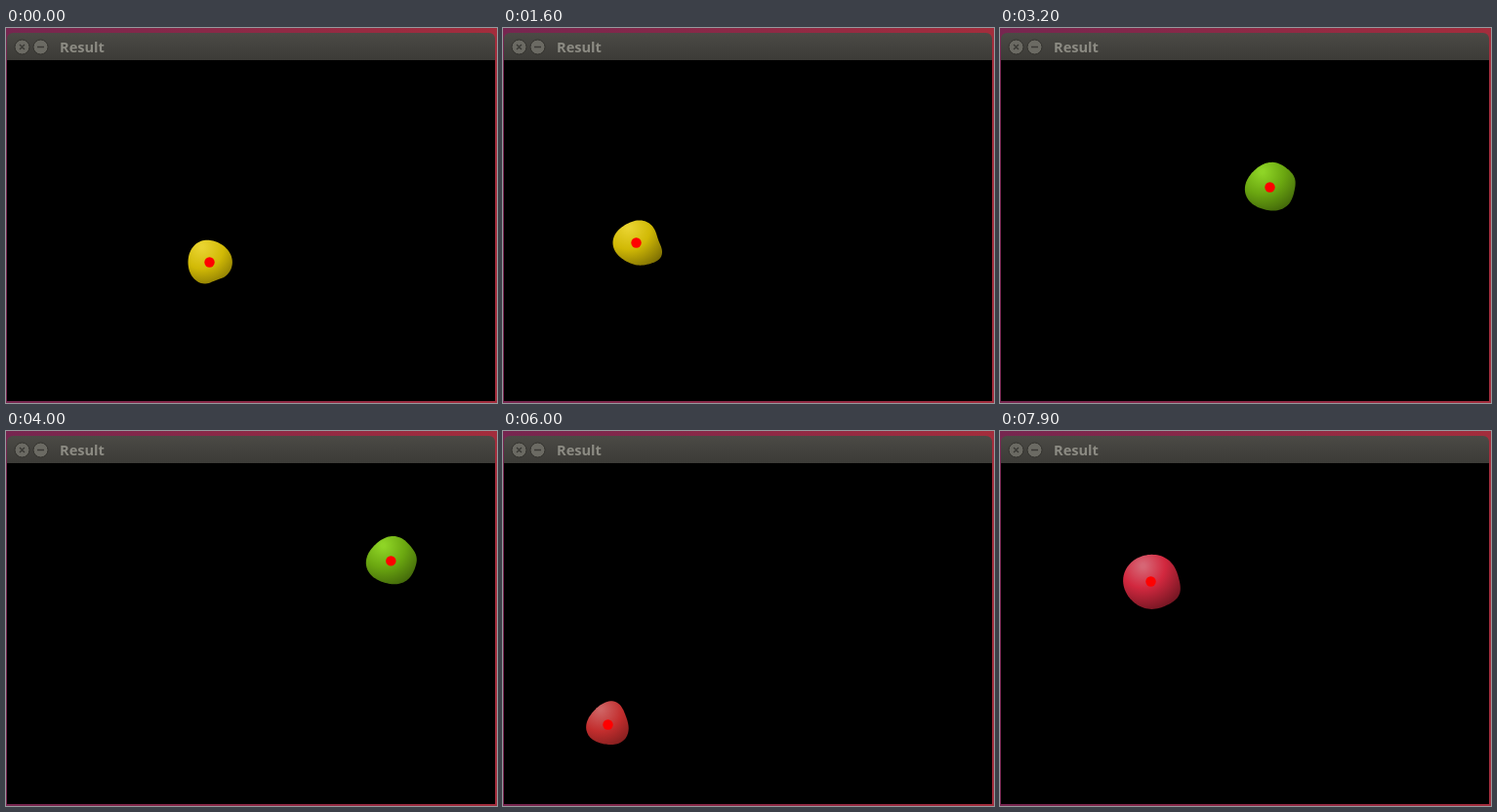
Write an HTML page with a canvas that moves like this. It is 503 px wide and 385 px high and loops after 8000 ms.

```html
<!DOCTYPE html>
<html lang="en">
<head>
<meta charset="utf-8">
<title>Result</title>
<style>
  html, body { margin: 0; width: 100%; height: 100%; overflow: hidden; }
  body { position: relative; background: linear-gradient(90deg, #762650, #a32d3c); }
  .bar { position: absolute; left: 1px; top: 5px; width: 500px; height: 28px; border-radius: 6px 6px 0 0;
    background: linear-gradient(#4b4a45, #3c3b37); }
  .bar svg { position: absolute; left: 0; top: 0; }
  .bar span { position: absolute; left: 54px; top: 4px; color: #8c8b83;
    font: bold 14.6px/20px "Open Sans", "Noto Sans", sans-serif; }
  canvas { position: absolute; left: 1px; top: 33px; background: #000; }
</style>
</head>
<body>
<div class="bar">
  <svg width="50" height="28" stroke="#3c3b37" stroke-width="1.5">
    <g fill="#6b6a63" stroke="#33322e" stroke-width="1">
      <circle cx="15.5" cy="14.5" r="7.5"/><circle cx="34.5" cy="14.5" r="7.5"/>
    </g>
    <path d="M13 12l5 5M18 12l-5 5M31 14.5h7"/>
  </svg>
  <span>Result</span>
</div>
<canvas width="500" height="350"></canvas>
<script>
const ctx = document.querySelector('canvas').getContext('2d');
ctx.translate(-1, -33);

const YELLOW = [53, 95, 42], GREEN = [84, 82, 36], RED = [360, 62, 47], PINK = [352, 68, 49];

// A blob is a circle with one bump (or dent) and three soft lobes; angles in degrees.
const blob = (color, size, bump, bumpAt, lobe, lobeAt) => [size, bump, bumpAt, lobe, lobeAt, ...color];

// Key points: [time, x, y, blob where the outline is set].
const balls = [
  { from: 0, to: 2800, keys: [
    [0, 208, 240, blob(YELLOW, 22.7, -2.5, 72, .7, 0)],
    [900, 279, 200],
    [1400, 130, 206],
    [1600, 136, 220, blob(YELLOW, 22.8, 6.5, 27, 1.2, 60)],
    [2200, 289, 223, blob(YELLOW, 21.8, 4, 32, .6, 20)],
    [2700, 389, 358]] },
  { from: 2900, to: 5500, keys: [
    [2900, 262, 214],
    [3200, 276, 163, blob(GREEN, 24.7, 3.5, -20, 1.2, 45)],
    [3600, 285, 158],
    [4100, 404, 130],
    [4500, 286, 150],
    [4800, 216, 198, blob(GREEN, 23, 1.5, 65, 1.7, 57)],
    [5100, 165, 238],
    [5400, 237, 214]] },
  { from: 5700, to: 8000, keys: [
    [5700, 135, 353],
    [6000, 107, 301, blob(RED, 21.5, 2, -70, 1.3, 40)],
    [6300, 134, 183],
    [6700, 207, 178],
    [7200, 179, 162],
    [7900, 154, 154, blob(PINK, 28, 4.5, 25, .5, 75)]] }
];

for (const ball of balls) {
  ball.path = ball.keys.map(k => k.slice(0, 3));
  ball.looks = ball.keys.filter(k => k[3]).map(k => [k[0], ...k[3]]);
}

// Index of the segment around t and the progress inside it.
function locate(keys, t) {
  const i = Math.max(0, Math.min(keys.length - 2, keys.findLastIndex(k => k[0] <= t)));
  const span = keys[i + 1][0] - keys[i][0];
  return { i, span, u: Math.max(0, Math.min(1, (t - keys[i][0]) / span)) };
}

// Hermite curve through the path points.
function position(path, t) {
  const { i, span, u } = locate(path, t);
  const slope = (n, c) => {
    const p = path[Math.max(n - 1, 0)], q = path[Math.min(n + 1, path.length - 1)];
    return (q[c] - p[c]) / (q[0] - p[0]) * span;
  };
  return [1, 2].map(c => {
    const a = path[i][c], d = path[i + 1][c] - a, m = slope(i, c), w = slope(i + 1, c);
    return a + u * (m + u * (3 * d - 2 * m - w + u * (m + w - 2 * d)));
  });
}

function appearance(looks, t) {
  const { i, u } = locate(looks, t);
  return looks[i].slice(1).map((v, c) => v + (looks[i + 1][c + 1] - v) * u ** 3);
}

function drawBall({ path, looks }, t) {
  const [x, y] = position(path, t);
  const [size, bump, bumpAt, lobe, lobeAt, h, s, l] = appearance(looks, t);
  ctx.save();
  ctx.translate(x + .5, y + .5);

  ctx.beginPath();
  for (let deg = 0; deg < 360; deg += 4) {
    const off = (deg - bumpAt + 540) % 360 - 180;
    const r = size + bump * Math.exp(-((off / 26) ** 2)) + lobe * Math.cos((deg - lobeAt) * Math.PI / 60);
    const a = deg * Math.PI / 180;
    ctx.lineTo(r * Math.cos(a), r * Math.sin(a));
  }
  const shade = ctx.createRadialGradient(-8, -16, 2, -8, -16, 48);
  shade.addColorStop(0, `hsl(${h} ${s * .85}% ${l + 13}%)`);
  shade.addColorStop(.45, `hsl(${h} ${s}% ${l}%)`);
  shade.addColorStop(1, `hsl(${h} ${s}% ${l * .55}%)`);
  ctx.fillStyle = shade;
  ctx.fill();

  ctx.beginPath();
  ctx.arc(0, 0, 5.2, 0, 2 * Math.PI);
  ctx.fillStyle = '#f00';
  ctx.fill();
  ctx.restore();
}

function draw() {
  const t = Math.floor(performance.now() % 8000 / 100) * 100;
  ctx.clearRect(0, 0, 503, 385);
  const ball = balls.find(b => t >= b.from && t < b.to);
  if (ball) drawBall(ball, t);
  requestAnimationFrame(draw);
}
draw();
</script>
</body>
</html>
```
